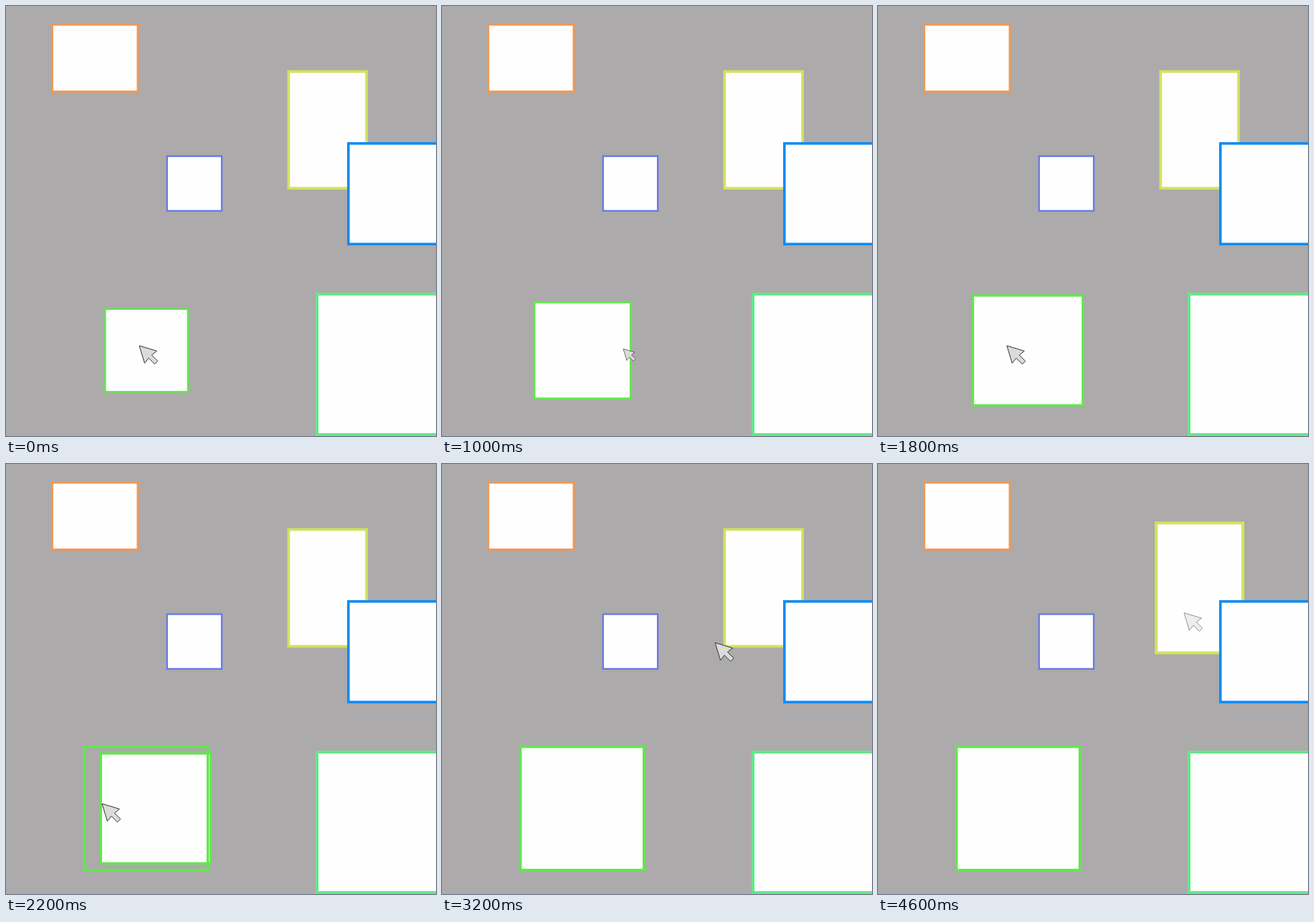
An HTML page with a canvas for the animation above (4.7 s loop, 600x600 px).

```html
<!DOCTYPE html>
<html lang="en">
<head>
<meta charset="utf-8">
<title>Growing boxes</title>
<style>
  html, body { margin: 0; width: 100%; height: 100%; overflow: hidden; background: #acaaab; }
  canvas { display: block; width: 600px; height: 600px; }
</style>
</head>
<body>
<canvas id="stage" width="600" height="600"></canvas>
<script>
const ctx = document.getElementById('stage').getContext('2d');
const LOOP = 4700, STEP = 100, FADE = 4600;
const HOLD = 130, FILL = 520; // press length, delay until the box takes its new size

// x, y is the centre; w, h the outer size; grow the relative gain per click
const box = (color, x, y, w, h, line, grow = 0) => ({ color, x, y, w, h, line, grow });
const green = box('#61e84c', 196.1, 480.6, 118, 118, 2.5, 0.163);
const yellow = box('#d2e35c', 448.7, 172.9, 112.4, 166.6, 3.7, 0.112);
const boxes = [
  green,
  yellow,
  box('#ee9a56', 124.2, 72.7, 122.5, 96.5, 3),
  box('#6478ea', 262.9, 247.7, 78.6, 78.6, 2.3),
  box('#0f8cf3', 576, 262, 200, 144, 3.6),
  box('#63e78b', 532, 500, 200, 200, 4)
];

// An edge click also pushes the box sideways
const clicks = [
  { at: 50, target: green, push: 0 },
  { at: 880, target: green, push: 13 },
  { at: 1970, target: green, push: -13.5 },
  { at: 3590, target: yellow, push: 0 }
];

const home = { x: 199, y: 487 };
const moves = [
  { from: 560, to: 860, x: 261.5, y: 487 },
  { from: 1560, to: 1960, x: 147, y: 487 },
  { from: 2500, to: 3330, x: 440, y: 220.7 }
];

// Half of the arrow; the rest is its mirror image across the diagonal
const half = [[11.4, -5.6], [4.3, 0], [12.8, 8.5]];
const arrow = [[-13, -13], ...half, ...half.map(([x, y]) => [y, x]).reverse()];

function drawBox(b, level, shift, filled = true) {
  const scale = 1 + b.grow * level;
  const line = b.line * (1 + (scale - 1) * 0.9);
  const w = b.w * scale - line, h = b.h * scale - line;
  const rect = [b.x + shift - w / 2, b.y - h / 2, w, h];
  ctx.fillStyle = '#fffeff';
  if (filled) ctx.fillRect(...rect);
  ctx.strokeStyle = b.color;
  ctx.lineWidth = line;
  ctx.strokeRect(...rect);
}

function cursorAt(t) {
  let { x, y } = home;
  for (const m of moves) {
    const k = Math.min(1, Math.max(0, (t - m.from) / (m.to - m.from)));
    x += (m.x - x) * k;
    y += (m.y - y) * k;
  }
  return [x, y];
}

function drawCursor(t, pressed) {
  const size = pressed ? 0.66 : 1;
  ctx.save();
  ctx.translate(...cursorAt(t));
  ctx.scale(size, size);
  ctx.globalAlpha = t < FADE ? 1 : 0.5;
  ctx.beginPath();
  for (const p of arrow) ctx.lineTo(...p);
  ctx.closePath();
  ctx.fillStyle = '#dcdbdc';
  ctx.fill();
  ctx.strokeStyle = '#333';
  ctx.lineWidth = 1;
  ctx.stroke();
  ctx.restore();
}

// Growth and sideways shift of a box after all its clicks older than delay
function stateOf(b, t, delay) {
  const done = clicks.filter(c => c.target === b && t - c.at >= delay);
  return [done.length, done.reduce((sum, c) => sum + c.push, 0)];
}

function draw(t) {
  ctx.fillStyle = '#acaaab';
  ctx.fillRect(0, 0, 600, 600);
  for (const b of boxes) drawBox(b, ...stateOf(b, t, FILL));

  const active = clicks.find(c => t >= c.at && t < c.at + FILL);
  const pressed = active && t < active.at + HOLD;
  if (active && !pressed) drawBox(active.target, ...stateOf(active.target, t, HOLD), false);
  drawCursor(t, pressed);
}

const start = performance.now();
function tick() {
  const t = (performance.now() - start) % LOOP;
  draw(Math.floor(t / STEP) * STEP);
  requestAnimationFrame(tick);
}
tick();
</script>
</body>
</html>
```
